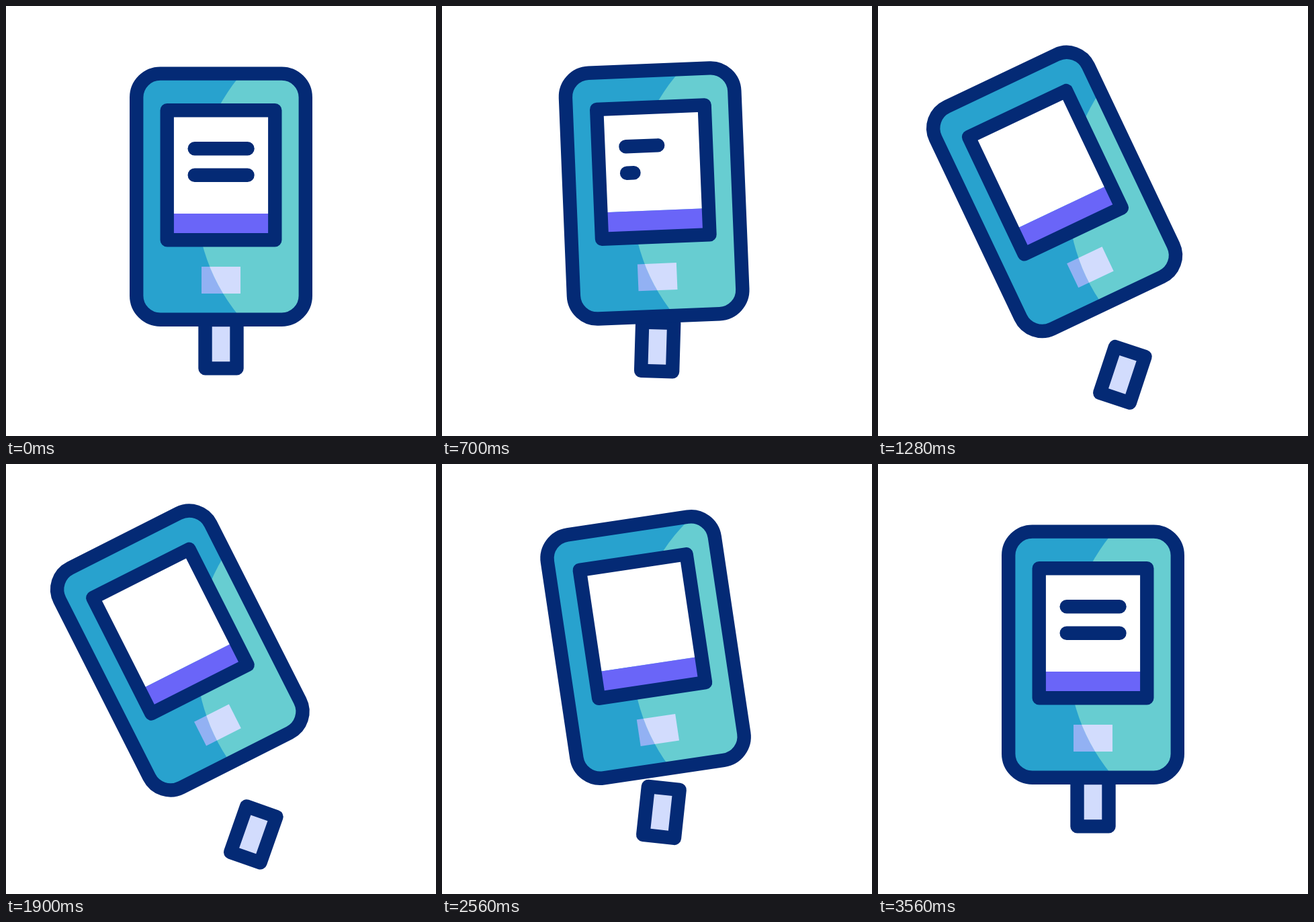
Write an HTML page with a canvas that moves like this. It is 640 px wide and 640 px high and loops after 3.6 s.

```html
<!DOCTYPE html>
<html>
<head>
<meta charset="utf-8">
<style>
html, body { margin: 0; height: 100%; overflow: hidden; background: #fff; }
canvas { display: block; }
</style>
</head>
<body>
<canvas id="stage" width="640" height="640"></canvas>
<script>
const ctx = document.getElementById('stage').getContext('2d');
const LOOP = 3600, STROKE = 20.4;
const NAVY = '#042a75', BLUE = '#28a2ce', TEAL = '#67cdd1';
const LILAC = '#d2dcfd', SHADE = '#92b1f3', VIOLET = '#6a65f8';

// Progress of cubic-bezier(x1, 0, x2, 1) between two times
function ease(time, start, end, x1, x2) {
  const x = Math.min(1, Math.max(0, (time - start) / (end - start)));
  let lo = 0, hi = 1;
  for (let i = 0; i < 30; i++) {
    const t = (lo + hi) / 2, s = 1 - t;
    if (3 * s * s * t * x1 + 3 * s * t * t * x2 + t * t * t < x) lo = t; else hi = t;
  }
  return hi * hi * (3 - 2 * hi);
}

function box(color, x, y, w, h) {
  ctx.fillStyle = color;
  ctx.fillRect(x, y, w, h);
}

function outline(x, y, w, h, r) {
  ctx.beginPath();
  ctx.roundRect(x, y, w, h, r);
  ctx.stroke();
}

// Rotate about (x, y) and shift by (dx, dy)
function pose(x, y, dx, dy, degrees) {
  ctx.translate(x + dx, y + dy);
  ctx.rotate(degrees * Math.PI / 180);
  ctx.translate(-x, -y);
}

function poseBody(p) {
  pose(320, 408, 9 * p - 14.3 * p * p, -27.5 * p / (p + 0.405), -27.15 * p);
}

function drawStrip(p) {
  ctx.save();
  pose(320, 503.2, 49.3 * p ** 1.75, 48.8 * p, 19.6 * p);
  box(LILAC, 300, 470, 40, 68);
  outline(296.5, 467, 47, 72.4, 0);
  ctx.restore();
}

function drawFace(base, label, p) {
  ctx.save();
  poseBody(p);
  ctx.beginPath();
  ctx.roundRect(194.2, 100.6, 251.6, 366.1, 35.5);
  ctx.fillStyle = base;
  ctx.fill();
  box(label, 291, 388, 58, 40);
  ctx.restore();
}

function drawLine(y, amount) {
  if (amount < 0.002) return;
  ctx.beginPath();
  ctx.moveTo(280.7, y);
  ctx.lineTo(280.7 + 78.8 * amount, y);
  ctx.stroke();
}

function draw(time) {
  const tilt = ease(time, 300, 1652, 0.75, 0.23) - ease(time, 1652, 3350, 0.85, 0.15);
  const line1 = 1 - ease(time, 386, 1186, 0.6, 0.2) + ease(time, 2777, 3480, 0.6, 0.2);
  const line2 = 1 - ease(time, 210, 1010, 0.6, 0.2) + ease(time, 2880, 3575, 0.6, 0.2);

  box('#fff', 0, 0, 640, 640);
  ctx.strokeStyle = NAVY;
  ctx.lineWidth = STROKE;
  ctx.lineCap = ctx.lineJoin = 'round';
  drawStrip(tilt);

  // The light area stays still while the body turns beneath it
  drawFace(BLUE, SHADE, tilt);
  ctx.save();
  ctx.beginPath();
  ctx.arc(563, 283.5, 280, 0, 2 * Math.PI);
  ctx.clip();
  drawFace(TEAL, LILAC, tilt);
  ctx.restore();

  ctx.save();
  poseBody(tilt);
  outline(194.2, 100.6, 251.6, 366.1, 35.5);
  box('#fff', 240, 156, 160, 153);
  box(VIOLET, 240, 309, 160, 39);
  outline(239.7, 155.3, 160.6, 193, 0);
  drawLine(212.3, line1);
  drawLine(251.8, line2);
  ctx.restore();
}

const begin = performance.now();
function tick() {
  draw((performance.now() - begin) % LOOP);
  requestAnimationFrame(tick);
}
tick();
</script>
</body>
</html>
```
